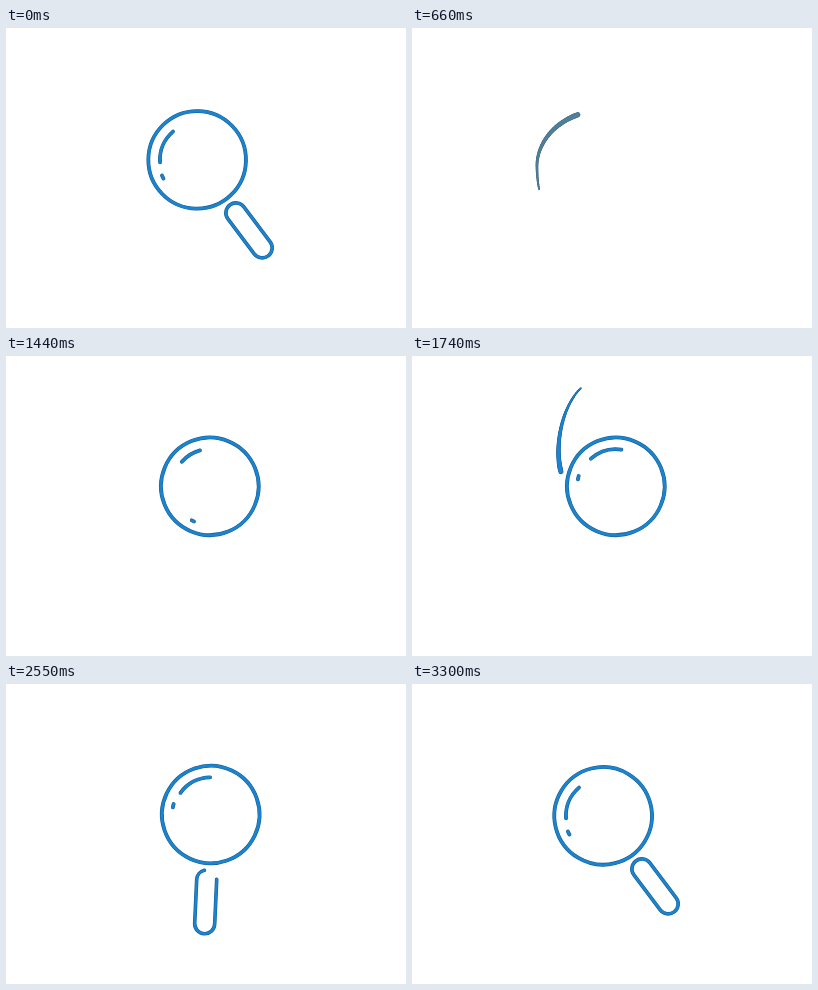
Recreate the animation shown at these times as an HTML page with a canvas. Size 400x300 px, loop 3.93 s.

```html
<!DOCTYPE html>
<html lang="en">
<head>
<meta charset="utf-8">
<title>Magnifying glass</title>
<style>
  html, body { margin: 0; width: 100%; height: 100%; overflow: hidden; background: #fff; }
  canvas { display: block; }
</style>
</head>
<body>
<canvas id="stage" width="400" height="300"></canvas>
<script>
const ctx = document.getElementById('stage').getContext('2d');
const LOOP = 3930, STEP = 30;
const BLUE = { rim: '#145c91', fill: '#1c84cf' };
const SLATE = { rim: '#426679', fill: '#4f809b' };
const LENS = { x: 4, y: -19.7, r: 48.8 };
const HANDLE = { x: 3, top: 46, bottom: 89.7, r: 10 };
const HANDLE_LENGTH = 2 * (HANDLE.bottom - HANDLE.top) + 2 * Math.PI * HANDLE.r;
const REST = -37;
const rad = deg => deg * Math.PI / 180;
const linear = p => p;
const sine = p => (1 - Math.cos(Math.PI * p)) / 2;

// Value at time t along [time, value] keys.
function track(t, keys, ease = sine) {
  if (t <= keys[0][0]) return keys[0][1];
  for (let i = 1; i < keys.length; i++) {
    const [t0, v0] = keys[i - 1], [t1, v1] = keys[i];
    if (t < t1) return v0 + (v1 - v0) * ease((t - t0) / (t1 - t0));
  }
  return keys[keys.length - 1][1];
}

// Strokes a path in the fill colour with a thin darker rim.
function ink(path, width, color = BLUE) {
  ctx.strokeStyle = color.rim;
  ctx.lineWidth = width;
  ctx.stroke(path);
  ctx.strokeStyle = color.fill;
  ctx.lineWidth = width - 1.1;
  ctx.stroke(path);
}

function makeSwoosh(d, color, width, head, tail) {
  const path = document.createElementNS('http://www.w3.org/2000/svg', 'path');
  path.setAttribute('d', d);
  return { path, color, width, head, tail };
}

const swooshes = [
  makeSwoosh('M226 182C200 208 126 224 125 140C124 118 140 95 168 86C190 75 200 61 220 61S253 90 253 130',
    SLATE, 5.2, [[330, 0], [540, 150], [660, 219], [870, 360]], [[480, 0], [660, 126], [960, 360]]),
  makeSwoosh('M200 24C188 24 178 25 169 32C150 50 142 90 149 116C155 140 158 168 175 178S193 190 193 202',
    BLUE, 5, [[1560, 0], [1740, 122], [2160, 226]], [[1650, 0], [1740, 33], [2260, 226]])
];

// Brush stroke: thin at the tail, thick at the head.
function drawSwoosh({ path, color, width, head, tail }, t) {
  const total = path.getTotalLength();
  const end = Math.min(total, track(t, head, linear));
  const start = Math.min(total, track(t, tail, linear));
  if (end - start < 1) return;
  const parts = 40;
  const points = Array.from({ length: parts + 1 },
    (_, i) => path.getPointAtLength(start + (end - start) * i / parts));
  for (const [shade, inset] of [[color.rim, 0], [color.fill, 1.1]]) {
    ctx.strokeStyle = shade;
    for (let i = 1; i <= parts; i++) {
      ctx.lineWidth = Math.max(0.3, 1.8 + (width - 1.8) * i / parts - inset);
      ctx.beginPath();
      ctx.moveTo(points[i - 1].x, points[i - 1].y);
      ctx.lineTo(points[i].x, points[i].y);
      ctx.stroke();
    }
  }
}

function drawArc(radius, from, to, width = 3.8) {
  if (to - from < 0.5) return;
  const path = new Path2D();
  path.arc(LENS.x, LENS.y, radius, rad(from), rad(Math.min(to, from + 360)));
  ink(path, width);
}

function drawHandle(from, to) {
  if (to - from < 0.5) return;
  const { x, top, bottom, r } = HANDLE;
  const path = new Path2D();
  path.arc(x, top, r, rad(270), rad(180), true);
  path.arc(x, bottom, r, rad(180), 0, true);
  path.arc(x, top, r, 0, rad(-90), true);
  ctx.setLineDash([to - from, 999]);
  ctx.lineDashOffset = -from;
  ink(path, 3.6);
  ctx.setLineDash([]);
}

function drawGlass(t) {
  const erasing = t < 660;
  const angle = erasing ? REST
    : track(t, [[2370, 0], [2640, 3.5], [2670, 3.5], [2980, -41], [3300, REST]]);
  ctx.save();
  ctx.translate(199.8, 150);
  ctx.rotate(rad(angle));
  if (erasing) {
    drawArc(LENS.r, track(t, [[0, 128], [450, 488]]), 488);
    drawArc(37.2, track(t, [[0, 213], [300, 266.5]]), 266.5);
    drawArc(38.5, track(t, [[0, 188], [240, 193]]), 193);
    drawHandle(track(t, [[0, 0], [480, HANDLE_LENGTH]]), HANDLE_LENGTH);
  } else {
    drawArc(LENS.r, track(t, [[960, 0], [1260, -112]]), track(t, [[840, 0], [1245, 248]]));
    if (t >= 1140) {
      drawArc(37.2, track(t, [[1170, 209], [1650, 229.5], [2100, 213]]),
        track(t, [[1140, 210], [1170, 217], [1650, 280], [2100, 266.5]]));
      const dot = track(t, [[1110, 24], [1170, 34.5], [1700, 193], [2000, 190.6]]);
      const half = track(t, [[1170, 1], [1700, 2.6]]);
      drawArc(38.5, dot - half, dot + half);
    }
    drawHandle(track(t, [[2250, 22], [2640, 0]]), track(t, [[2160, 22], [2660, HANDLE_LENGTH]]));
  }
  ctx.restore();
}

function render(now) {
  const t = Math.floor(now % LOOP / STEP) * STEP;
  ctx.clearRect(0, 0, 400, 300);
  ctx.lineCap = 'round';
  drawGlass(t);
  swooshes.forEach(swoosh => drawSwoosh(swoosh, t));
}

let origin;
function tick(now) {
  origin ??= now;
  render(now - origin);
  requestAnimationFrame(tick);
}
requestAnimationFrame(tick);
</script>
</body>
</html>
```
